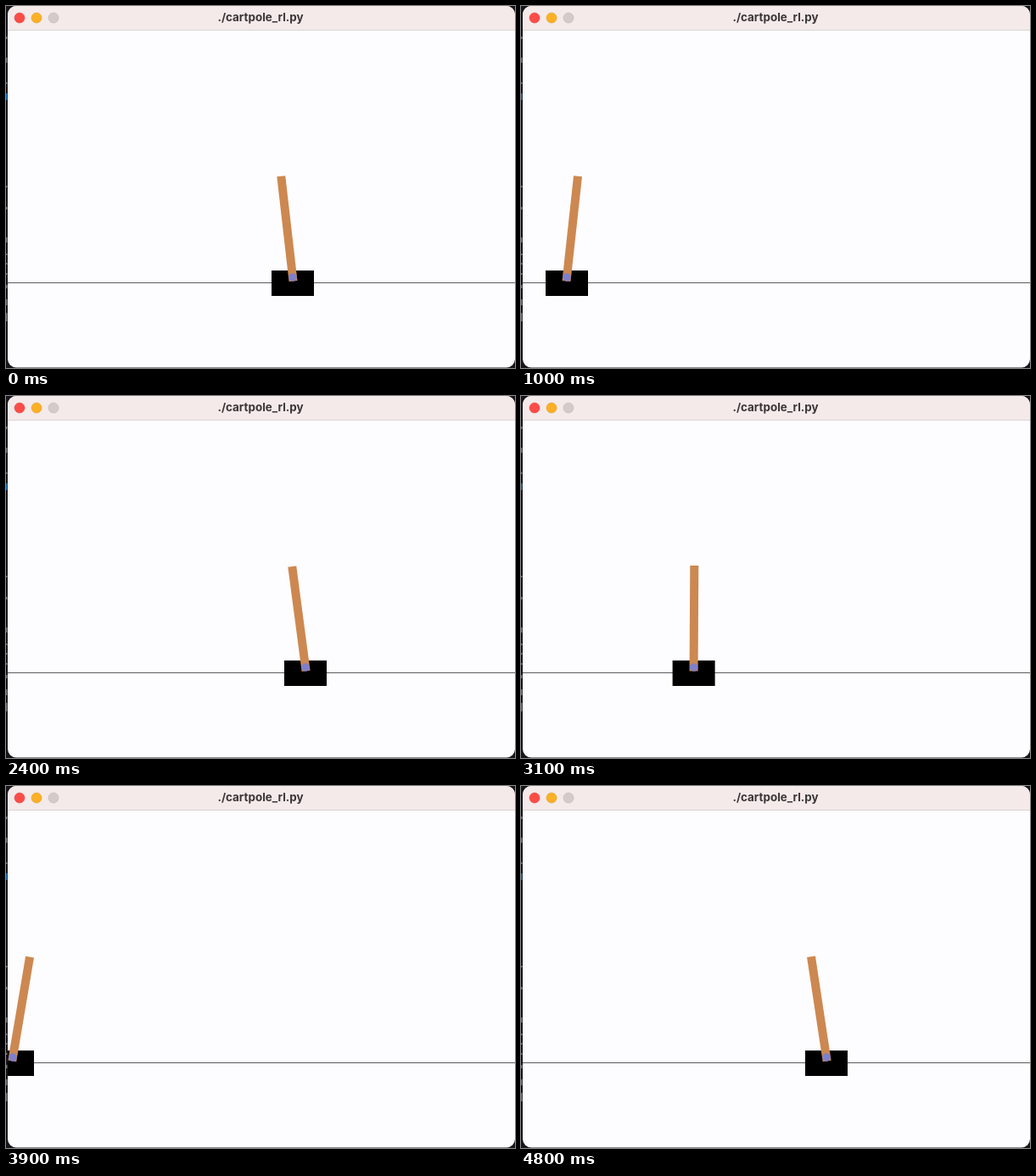
Recreate the animation shown at these times as an HTML page. Size 600x427 px, loop 4900 ms.

```html
<!DOCTYPE html>
<html lang="en">
<head>
<meta charset="utf-8">
<title>Cart and pole</title>
<style>
  html, body { margin: 0; width: 100%; height: 100%; overflow: hidden; background: #17151a; }
  svg { display: block; width: 600px; height: 427px; }
  text { font: 700 13.4px Inter, "Open Sans", sans-serif; fill: #3b3637; text-anchor: middle; }
</style>
</head>
<body>
<svg viewBox="0 0 600 427">
  <clipPath id="window"><rect x="2" width="598" height="426.4" rx="10"/></clipPath>
  <rect width="600" height="427" fill="#17151a"/>
  <!-- slivers of the window behind -->
  <g stroke="#77757a" stroke-width="1.5">
    <path d="M0.7 36v3M0.7 61v6M0.7 90v2M0.7 212v2M0.7 237v3M0.7 273v6M0.7 292v2M0.7 303v2M0.7 315v2M0.7 329v4M0.7 346v7M0.7 362v10"/>
    <path d="M0.7 103v8" stroke="#1f6fb5"/>
  </g>
  <g clip-path="url(#window)">
    <rect width="600" height="427" fill="#fdfcfe"/>
    <rect width="600" height="28" fill="#f4eae9"/>
    <rect y="28" width="600" height="1" fill="#dcd4d5"/>
    <g stroke-width=".6">
      <circle cx="16" cy="14" r="6" fill="#fc4c48" stroke="#dc4440"/>
      <circle cx="36" cy="14" r="6" fill="#fdb025" stroke="#dd9a25"/>
      <circle cx="56" cy="14" r="6" fill="#d3cbca" stroke="#beb7b6"/>
    </g>
    <text x="300" y="18">./cartpole_rl.py</text>
    <rect y="326" width="600" height="1" fill="#5c5b5c"/>
    <g id="cart">
      <rect x="-25" y="-8" width="50" height="30"/>
      <g id="pole">
        <rect x="-5" y="-120" width="10" height="124.5" fill="#cc8850"/>
        <circle r="4.8" fill="#7f7fcb"/>
      </g>
    </g>
  </g>
</svg>
<script>
  const LOOP = 4900, FRAME = 100, STEP = 200, POLE = 120;
  const cart = document.getElementById("cart");
  const pole = document.getElementById("pole");

  // One key per STEP: cart centre, and how far the pole tip leans to the right of it.
  const centres = [338, 315, 254, 175.5, 104, 54, 26, 31, 76, 151, 233, 306, 353,
                   360, 319, 246, 160, 77, 18, -0.5, 27.5, 97, 190, 287, 360];
  const leans = [-13.7, -11.9, -6.1, 1.5, 8.4, 13, 16.3, 16.2, 11.9, 4.5, -3.7, -11.1, -15.7,
                 -16.2, -11.7, -3.8, 5.2, 13.5, 19.3, 21, 17.9, 10.4, 0.4, -10, -18];

  // Catmull-Rom curve through evenly spaced keys
  function curve(keys, pos) {
    const i = Math.floor(pos), u = pos - i;
    const key = n => keys[Math.max(0, Math.min(keys.length - 1, n))];
    const [a, b, c, d] = [key(i - 1), key(i), key(i + 1), key(i + 2)];
    return b + u / 2 * (c - a + u * (2 * a - 5 * b + 4 * c - d + u * (3 * (b - c) + d - a)));
  }

  function draw(now) {
    const time = Math.floor(now % LOOP / FRAME) * FRAME;
    const pos = time / STEP;
    const angle = Math.asin(curve(leans, pos) / POLE) * 180 / Math.PI;
    cart.setAttribute("transform", `translate(${curve(centres, pos)} 320)`);
    pole.setAttribute("transform", `rotate(${angle})`);
  }

  const start = performance.now();
  function tick() {
    draw(performance.now() - start);
    requestAnimationFrame(tick);
  }
  tick();
</script>
</body>
</html>
```
